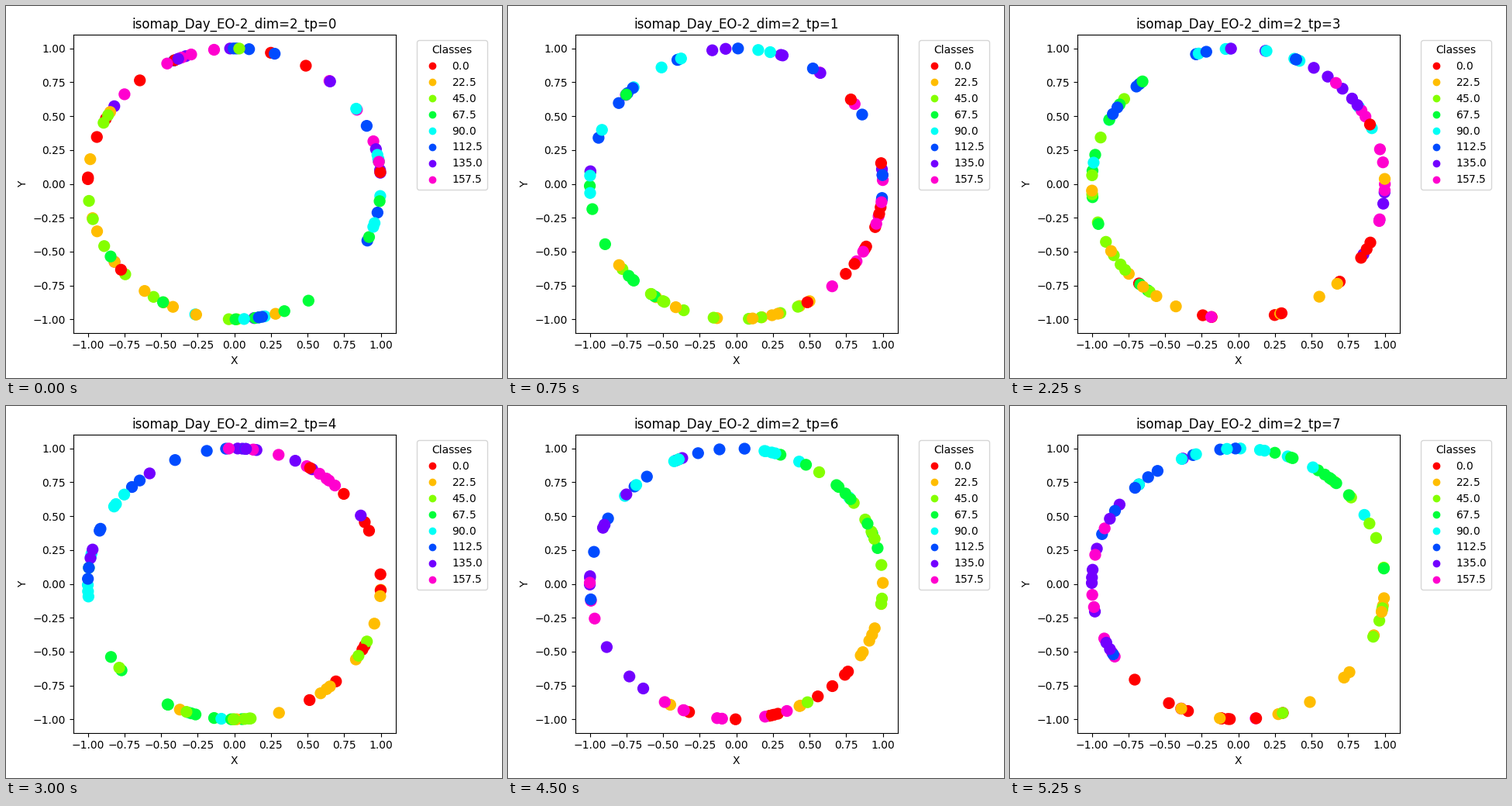
Animation, 640 px wide and 480 px high, one loop 6000 ms. Source, as a matplotlib script:

```python
import numpy as np
import matplotlib.pyplot as plt
from matplotlib.animation import FuncAnimation

CLASSES = np.arange(8)
TRIALS = 10    # dots per class
STEP = 22.5    # stimulus degrees between neighbouring classes

# Per time point: ring angle of class 0, turning sense of the class order,
# and spread of each class about its own centre, in degrees.
LAYOUT = [
    (140, 1, 60),
    (-30, -1, 45),
    (120, -1, 42),
    (-60, -1, 42),
    (0, -1, 35),
    (105, -1, 33),
    (-80, 1, 32),
    (-90, 1, 34),
]


def ring(tp):
    """Dot positions on the unit circle and their class labels, shuffled."""
    start, turn, spread = LAYOUT[tp]
    rng = np.random.default_rng(tp)
    k = rng.permutation(np.repeat(CLASSES, TRIALS))
    angle = np.radians(start + 45 * turn * k + rng.normal(0, spread, k.size))
    return np.column_stack([np.cos(angle), np.sin(angle)]), k * STEP


fig, ax = plt.subplots(figsize=(6.4, 4.8), dpi=100)
xy, label = ring(0)
dots = ax.scatter(xy[:, 0], xy[:, 1], s=100, c=label, cmap="hsv",
                  vmin=0, vmax=180)
ax.set(xlabel="X", ylabel="Y", xlim=(-1.1, 1.1), ylim=(-1.1, 1.1))
title = ax.set_title("")
ax.legend(*dots.legend_elements(), title="Classes",
          bbox_to_anchor=(1.05, 1), loc="upper left")


def update(tp):
    xy, label = ring(tp)
    dots.set_offsets(xy)
    dots.set_array(label)
    title.set_text(f"isomap_Day_EO-2_dim=2_tp={tp}")
    return dots, title


update(0)
fig.tight_layout()
anim = FuncAnimation(fig, update, frames=len(LAYOUT), interval=750, repeat=True)
plt.show()
```
